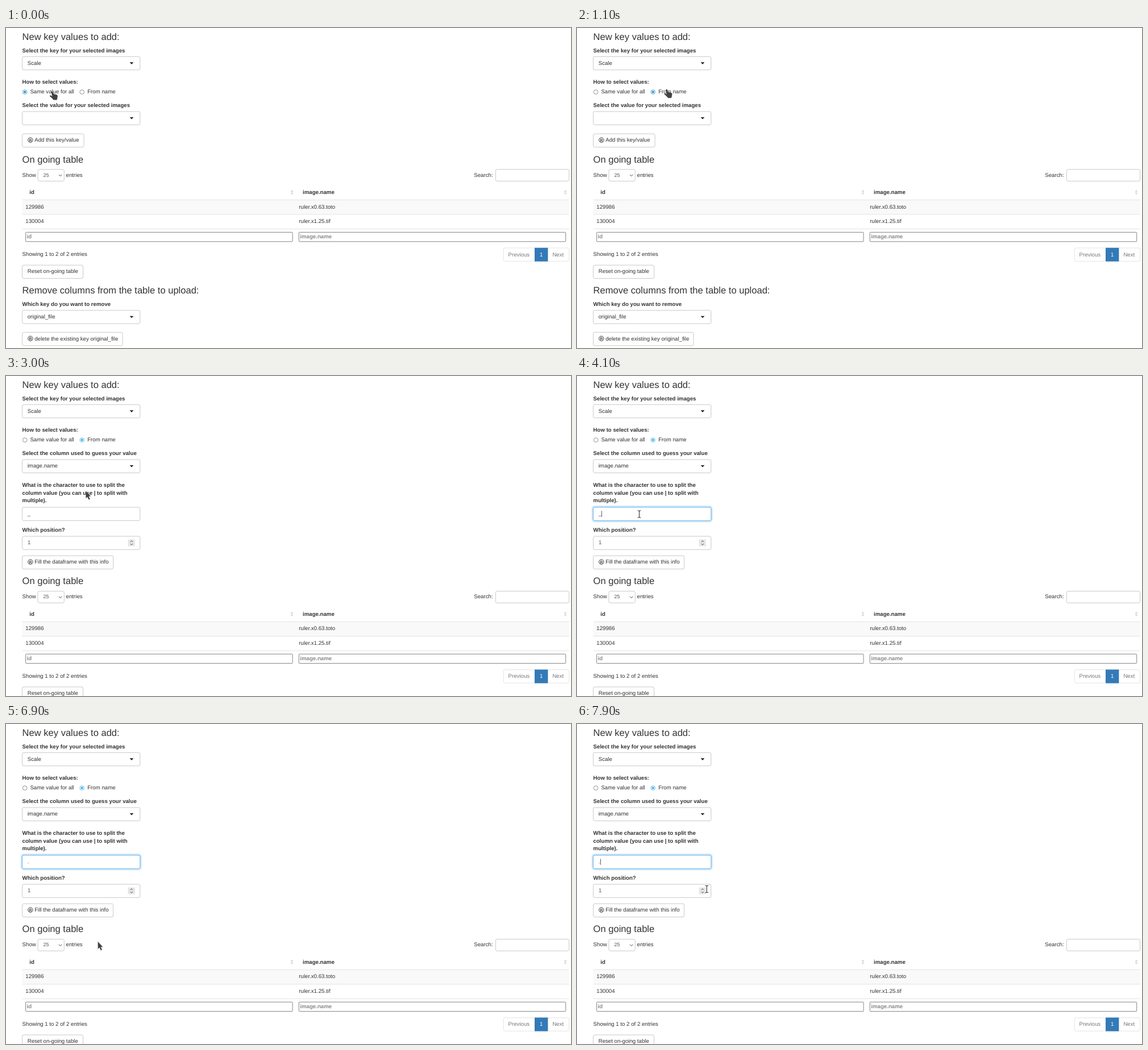
An HTML page that plays this animation: 994x563 px, repeating every 8 s.

```html
<!DOCTYPE html>
<html lang="en">
<head>
<meta charset="utf-8">
<title>Key values form</title>
<style>
html, body { margin: 0; width: 100%; height: 100%; overflow: hidden; background: #fff; }
svg { display: block; width: 994px; height: 563px; }
text { font: 9.66px "Liberation Sans", Arial, sans-serif; fill: #333; text-rendering: geometricPrecision; white-space: pre; }
.h { font-size: 16.56px; }
.b { font-weight: bold; }
.in { fill: #555; }
.sm { font-size: 9px; fill: #555; }
.hint { font-weight: bold; fill: #8a8a8a; }
.off { fill: #777; }
.on { fill: #fff; }
.box { fill: #fff; stroke: #bbb; stroke-width: .8; }
.line { stroke: #ddd; stroke-width: .8; }
.cur { fill: #424242; stroke: #fff; stroke-width: .5; stroke-opacity: .6; }
</style>
</head>
<body>
<svg viewBox="0 0 994 563">
  <defs><filter id="blur" x="-5%" y="-40%" width="110%" height="180%"><feGaussianBlur stdDeviation="1.7"/></filter></defs>
  <g id="top"></g>
  <g id="same"></g>
  <g id="named"></g>
  <g id="table"></g>
  <g id="arrow" class="cur"><path d="M0 0L9 9.6 5.5 10 7.7 14.6 5.2 15.8 3 11 0 13.4Z"/></g>
  <g id="hand" class="cur"><path d="M0 0c1-.6 1.8 0 2.2 1l1.3 3.5 4 .8c2 .5 3 1.5 3 3.5l-.6 3.5-.8 3h-6l-2-2.5-4.4-4c-1.2-1.2 .2-2.2 1.4-1.8l2.4 1.2L-.9 1.4C-1.1 .6-.6 .2 0 0z"/></g>
  <g id="beam"><path d="M-2.8-6.2Q-.4-6.2 0-5.2 .4-6.2 2.8-6.2M0-5.4V5.4M-2.8 6.2Q-.4 6.2 0 5.2 .4 6.2 2.8 6.2" fill="none" stroke="#333" stroke-width="1.1"/></g>
</svg>
<script>
const $ = id => document.getElementById(id);
const X = 28.6, W = 207.2, H = 23.4;

const text = (x, y, s, cls = '') => `<text x="${x}" y="${y}" class="${cls}">${s}</text>`;
const box = (x, y, w, h, r = 2.6, more = 'class="box"') =>
  `<rect x="${x}" y="${y}" width="${w}" height="${h}" rx="${r}" ${more}/>`;
const path = (d, fill, stroke = 'none') => `<path d="${d}" fill="${fill}" stroke="${stroke}"/>`;
const line = y => `<path class="line" d="M${X} ${y}H990.8"/>`;
const label = (y, s) => text(X, y, s, 'b');
const title = (y, s) => text(X, y, s, 'h');
const select = (y, s) => box(X, y, W, H) + text(37.7, y + 14.3, s) +
  path(`M217.6 ${y + 10}h6.8l-3.4 3.6z`, '#222');
const button = (y, w, s, id = '') => box(X, y, w, H, 2.6, `class="box" id="${id}"`) + text(50.2, y + 14.1, s) +
  `<circle cx="42.9" cy="${y + 10.9}" r="4.2" fill="none" stroke="#333" stroke-width="1"/>` +
  `<text x="40.5" y="${y + 13.4}" class="b" style="font-size:6.8px">R</text>`;
const radio = (x, id) => `<circle cx="${x}" cy="112.6" r="3.8" id="${id}" fill="#fff" stroke-width=".8"/>` +
  `<circle cx="${x}" cy="112.6" r="2.1" id="${id}Dot"/>`;
const sorter = x => path(`M${x - 2.4} 288.3l2.4-3.6 2.4 3.6zM${x - 2.4} 289.7l2.4 3.6 2.4-3.6z`, '#d4d4d4');
const field = (x, w, s) => box(x, 359.4, w, 16.4, 1, 'fill="#fff" stroke="#777" stroke-width=".9"') +
  text(x + 2, 370.3, s, 'hint');

$('top').innerHTML = title(20.9, 'New key values to add:') +
  label(42.5, 'Select the key for your selected images') + select(50.3, 'Scale') +
  label(98.2, 'How to select values:') +
  radio(33.2, 'r1') + text(42.4, 114.6, 'Same value for all') +
  radio(133.7, 'r2') + text(143.2, 114.6, 'From name');

$('same').innerHTML = label(139, 'Select the value for your selected images') +
  select(147, '') + button(186.2, 108.5, 'Add this key/value');

$('named').innerHTML = label(139, 'Select the column used to guess your value') + select(147, 'image.name') +
  label(194.6, 'What is the character to use to split the') +
  label(208.5, 'column value (you can use | to split with') +
  label(222.4, 'multiple).') +
  box(X, 231, W, H, 2.6, 'id="glow" fill="none" stroke="#66afe9" stroke-width="3" filter="url(#blur)"') +
  box(X, 231, W, H, 2.6, 'id="split" class="box"') +
  '<text id="typed" class="in" x="37.7" y="245.2"></text>' +
  '<rect id="caret" y="237.3" width=".8" height="10.4" fill="#333"/>' +
  label(274.2, 'Which position?') + box(X, 282, W, H) + text(37.9, 296.4, '1', 'in') +
  box(214.6, 287.4, 12.2, 12.2, 1, 'fill="#e6e6e6"') +
  path('M218.8 292l2.1-2.2 2.1 2.2M218.8 295l2.1 2.2 2.1-2.2', 'none', '#555') +
  button(316.2, 160, 'Fill the dataframe with this info', 'fill');

$('table').innerHTML = title(236.6, 'On going table') +
  text(X, 261.6, 'Show') + box(56, 248.8, 46.3, 20.6) + text(65.6, 261.6, '25', 'sm') +
  path('M93 258l2.6 2.7 2.6-2.7', 'none', '#444') + text(105.6, 261.6, 'entries') +
  text(823.3, 261.6, 'Search:') + box(861.4, 248.8, 129.2, 20.6) +
  text(41.3, 292.1, 'id', 'b') + sorter(503) + text(522, 292.1, 'image.name', 'b') + sorter(984) +
  box(X, 302.5, 962.2, 25.4, 0, 'fill="#f9f9f9"') + line(302.4) + line(328) + line(353.5) +
  text(34.3, 317.6, '129986') + text(515.3, 317.6, 'ruler.x0.63.toto') +
  text(34.3, 343.2, '130004') + text(515.3, 343.2, 'ruler.x1.25.tif') +
  field(34.6, 469.5, 'id') + field(515.3, 469.4, 'image.name') +
  text(X, 401.3, 'Showing 1 to 2 of 2 entries') +
  box(875.2, 387, 115.5, H, 2.6, 'fill="#fff" stroke="#ddd" stroke-width=".8"') +
  box(930, 386.7, 23.4, 24, 0, 'fill="#337ab7"') +
  text(883.6, 401.7, 'Previous', 'off') + text(939, 401.7, '1', 'on') + text(961.4, 401.7, 'Next', 'off') +
  box(X, 417.2, 107, H) + text(37.7, 431.3, 'Reset on-going table') +
  title(467.2, 'Remove columns from the table to upload:') +
  label(489, 'Which key do you want to remove') + select(496.7, 'original_file') +
  button(535.4, 176.4, 'delete the existing key original_file');

// Pointer stops: time, x, y
const stops = [
  [200, 80.5, 111.5], [300, 86, 111], [600, 149, 108.5], [700, 157, 108],
  [2900, 157, 108], [3000, 140.3, 202], [3200, 117, 226], [3400, 109.5, 234],
  [3500, 109.5, 234], [3700, 109.5, 243], [6200, 109.5, 243], [6400, 123, 300],
  [6700, 157, 444], [6900, 161.5, 382.6], [7100, 161.5, 382.6], [7200, 164, 374],
  [7400, 183, 329], [7600, 208, 301], [7900, 228.3, 290.5]
];

function pointer(t) {
  const i = stops.findIndex(s => s[0] >= t);
  if (i < 1) return stops[i < 0 ? stops.length - 1 : 0].slice(1);
  const [a, b] = [stops[i - 1], stops[i]];
  const k = (t - a[0]) / (b[0] - a[0]);
  return [a[1] + (b[1] - a[1]) * k, a[2] + (b[2] - a[2]) * k];
}

const show = (id, on) => $(id).style.display = on ? '' : 'none';

function setRadio(id, on, hover) {
  const blue = hover ? '#2a8cc8' : '#3daee9';
  $(id).setAttribute('stroke', on ? blue : '#777');
  $(id + 'Dot').setAttribute('fill', on ? blue : 'none');
}

function draw(now) {
  const t = Math.floor(now % 8000 / 100) * 100;   // the screen refreshes ten times a second
  const [x, y] = pointer(t);
  const named = t >= 1200, picked = t >= 1000;
  const inside = (top, right) => y > top && y < top + H && x > X && x < right;

  show('same', !named);
  show('named', named);
  $('table').setAttribute('transform', `translate(0 ${named ? 129.8 : 0})`);
  setRadio('r1', !picked, y < 120);
  setRadio('r2', picked, y < 120);

  const focus = t < 4000 ? 0 : t < 4100 ? .5 : 1;
  $('glow').style.opacity = focus * .75;
  $('split').style.stroke = focus ? '#66afe9' : '';
  $('typed').textContent = t < 5200 ? '_' : t < 5500 ? '' : '.';
  $('caret').setAttribute('x', t < 5200 ? 43.1 : t < 5500 ? 38.8 : 41.1);
  show('caret', focus && (t < 6500 || t >= 7500));

  const onFill = named && inside(316.2, 188.6);
  $('fill').style.fill = onFill ? '#e6e6e6' : '';
  const kind = y < 120 || onFill ? 'hand'
    : inside(231, X + W) || inside(282, X + W) ? 'beam' : 'arrow';
  for (const id of ['arrow', 'hand', 'beam']) show(id, id === kind);
  $(kind).setAttribute('transform', `translate(${x} ${y})`);
}

const start = performance.now();
(function tick() {
  draw(performance.now() - start);
  requestAnimationFrame(tick);
})();
</script>
</body>
</html>
```
